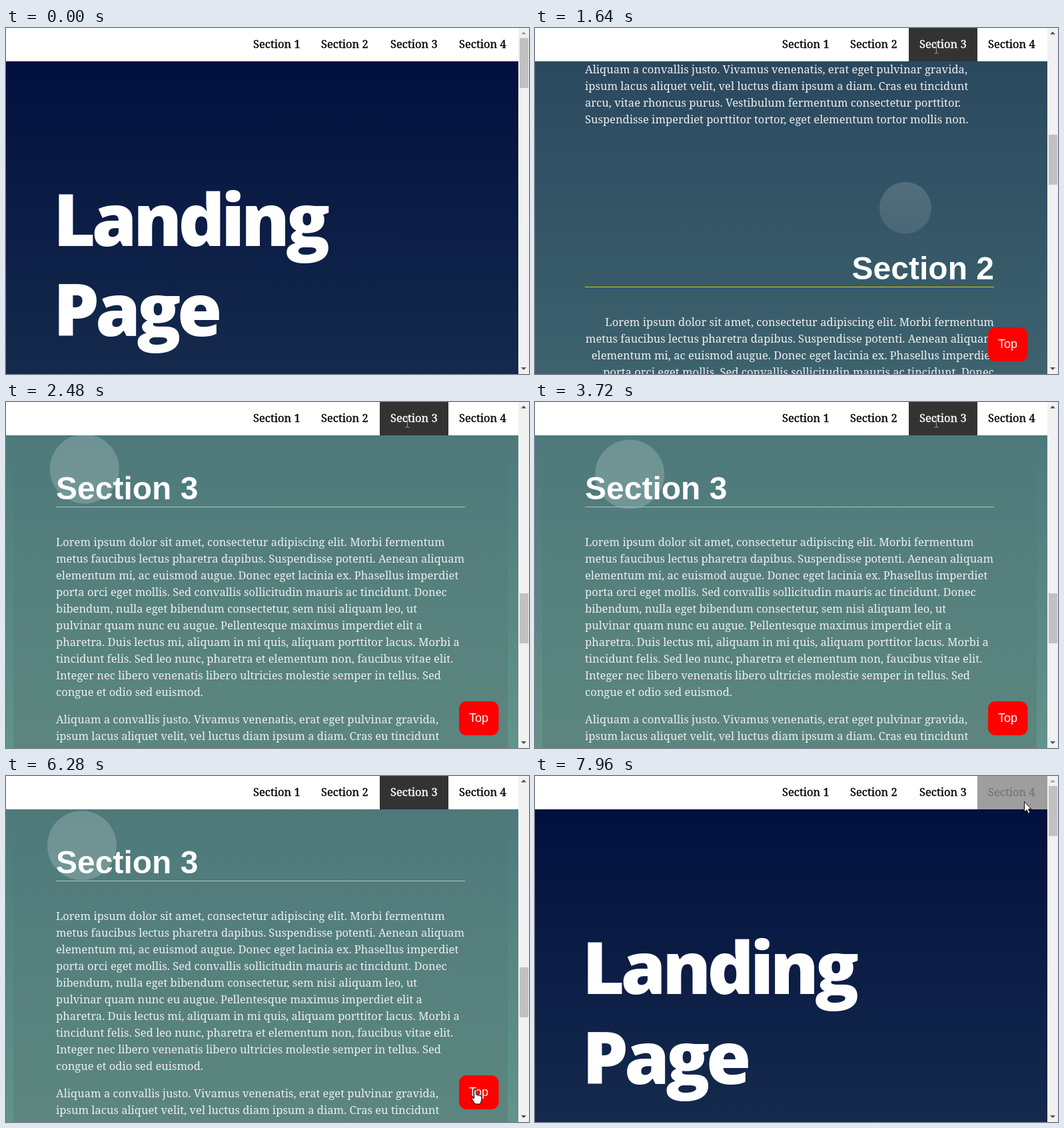
These frames come from a looping animation (785 px wide and 519 px high, 8000 ms). An HTML page:

```html
<!DOCTYPE html>
<html lang="en">
<head>
<meta charset="utf-8">
<title>Landing page</title>
<style>
  html, body { margin: 0; width: 100%; height: 100%; overflow: hidden; background: #fff; }
  svg { display: block; width: 100%; height: 100%; }
  text { white-space: pre; }
  .title { font: 800 109px "Open Sans", sans-serif; letter-spacing: -5.6px; fill: #fff; }
  .head { font: 700 48px "Liberation Sans", Arial, sans-serif; fill: #fff; }
  .copy { font: 16.55px "Noto Serif", serif; fill: #eee; }
  .nav { font: 16.55px "Noto Serif", serif; stroke-width: .35px; }
  .top { font: 18px "Liberation Sans", Arial, sans-serif; fill: #fff; }
</style>
</head>
<body>
<svg id="stage" viewBox="0 0 785 519" xmlns="http://www.w3.org/2000/svg">
  <defs>
    <linearGradient id="sky" x1="0" y1="0" x2="0" y2="1">
      <stop offset="0" stop-color="#000d3c"/>
      <stop offset="1" stop-color="#88cbab"/>
    </linearGradient>
    <linearGradient id="shade" x1="0" y1="0" x2="0" y2="1">
      <stop offset="0" stop-color="#464646" stop-opacity="0"/>
      <stop offset="1" stop-color="#464646" stop-opacity=".22"/>
    </linearGradient>
    <linearGradient id="glow" x1="0" y1="0" x2="0" y2="1">
      <stop offset="0" stop-color="#fff" stop-opacity=".16"/>
      <stop offset="1" stop-color="#fff" stop-opacity=".1"/>
    </linearGradient>
  </defs>
  <g id="page">
    <rect width="769" height="3384" fill="url(#sky)"/>
    <text class="title" x="71" y="327">Landing</text>
    <text class="title" x="71" y="462">Page</text>
    <rect id="panel" x="11" y="1900" width="742" height="600" fill="url(#shade)"/>
    <circle cx="556" cy="1276" r="39" fill="url(#glow)"/>
    <circle id="orb" r="52" fill="#fff"/>
  </g>
  <g id="button">
    <rect x="680" y="449" width="59.5" height="51" rx="11" fill="#f00"/>
    <text class="top" x="709.5" y="480" text-anchor="middle">Top</text>
  </g>
  <rect width="769" height="50" fill="#fff"/>
  <g id="menu"></g>
  <rect x="769" width="16" height="519" fill="#f1f1f1"/>
  <path id="up" d="M773 9.5L777 5.5L781 9.5Z"/>
  <path d="M773 509L777 513L781 509Z" fill="#505050"/>
  <rect id="thumb" x="771" width="13" height="75" fill="#c1c1c1"/>
  <g id="cursor">
    <path d="M-.5 .5V16L3 12.7L5.6 18.4L8 17.3L5.5 11.7H10Z" fill="#fff" stroke="#000"/>
    <path d="M-3 -7H-1L0 -6L1 -7H3M0 -6V6M-3 7H-1L0 6L1 7H3" fill="none" stroke="#b4b4b4" stroke-opacity=".85"/>
    <path d="M-1.5 12V1.5Q0 -.5 1.5 1.5V8L9 10Q10.5 11 10 15L8 22H0L-5 14Q-5 11 -1.5 14Z" fill="#fff" stroke="#000"/>
  </g>
</svg>
<script>
const LOOP = 8000, STEP = 70, TARGET = 1882, PITCH = 645;
const $ = id => document.getElementById(id);
const page = $("page"), menu = $("menu"), orb = $("orb"), cursor = $("cursor");

const paragraphs = [`Lorem ipsum dolor sit amet, consectetur adipiscing elit. Morbi fermentum
metus faucibus lectus pharetra dapibus. Suspendisse potenti. Aenean aliquam
elementum mi, ac euismod augue. Donec eget lacinia ex. Phasellus imperdiet
porta orci eget mollis. Sed convallis sollicitudin mauris ac tincidunt. Donec
bibendum, nulla eget bibendum consectetur, sem nisi aliquam leo, ut
pulvinar quam nunc eu augue. Pellentesque maximus imperdiet elit a
pharetra. Duis lectus mi, aliquam in mi quis, aliquam porttitor lacus. Morbi a
tincidunt felis. Sed leo nunc, pharetra et elementum non, faucibus vitae elit.
Integer nec libero venenatis libero ultricies molestie semper in tellus. Sed
congue et odio sed euismod.`,
`Aliquam a convallis justo. Vivamus venenatis, erat eget pulvinar gravida,
ipsum lacus aliquet velit, vel luctus diam ipsum a diam. Cras eu tincidunt
arcu, vitae rhoncus purus. Vestibulum fermentum consectetur porttitor.
Suspendisse imperdiet porttitor tortor, eget elementum tortor mollis non.`];

function add(parent, tag, attrs, text) {
  const el = document.createElementNS("http://www.w3.org/2000/svg", tag);
  set(el, attrs);
  if (text) el.textContent = text;
  return parent.appendChild(el);
}
function set(el, attrs) {
  for (const k in attrs) el.setAttribute(k, attrs[k]);
}

// Sections: heading, rule, two paragraphs; even ones are right aligned.
const rules = [1, 2, 3].map(n => {
  const y = 749 + (n - 1) * PITCH;
  const even = n % 2 === 0;
  const side = even ? { x: 689, "text-anchor": "end" } : { x: 75 };
  add(page, "text", { class: "head", y: y - 11, ...side }, "Section " + n);
  const rule = add(page, "rect", { x: 75, y, width: 614, height: 1, fill: "#cccc11" });
  let base = y + 59;
  for (const p of paragraphs) {
    for (const line of p.split("\n")) {
      add(page, "text", { class: "copy", y: base, ...side }, line);
      base += 25;
    }
    base += 16;
  }
  return rule;
});

const items = [[355, 102], [457, 104], [561, 103], [664, 105]].map(([x, width], i) => ({
  box: add(menu, "rect", { x, width, height: 50 }),
  label: add(menu, "text", { class: "nav", x: x + 16, y: 30 }, "Section " + (i + 1))
}));

const clamp = v => Math.max(0, Math.min(1, v));
const ramp = (t, start, length) => clamp((t - start) / length);
const smooth = v => v * v * (3 - 2 * v);
const lerp = (a, b, p) => a + (b - a) * p;
const mix = (a, b, p) => `rgb(${a.map((v, i) => Math.round(lerp(v, b[i], p)))})`;
const gray = v => [v, v, v];

// cubic-bezier(.42, 0, .58, 1)
function easeInOut(x) {
  let lo = 0, hi = 1;
  for (let i = 0; i < 24; i++) {
    const s = (lo + hi) / 2, r = 1 - s;
    if (1.26 * r * r * s + 1.74 * r * s * s + s * s * s < x) lo = s; else hi = s;
  }
  return smooth(lo);
}

// The screen refreshes every 70 ms while something moves.
const bursts = [0, 400, 1360, 6350, 6550, 7540];
function snap(t) {
  const start = bursts.filter(b => b <= t).pop();
  return start + Math.floor((t - start) / STEP) * STEP;
}

function scrollAt(t) {
  if (t < 1360 || t >= 6350) return 0;
  return TARGET * easeInOut(ramp(t, 1253, 744));
}

const path = [
  [400, 752, 460], [860, 602.5, 31], [4630, 602.5, 31], [5450, 681, 360],
  [6000, 704, 470], [7470, 704, 470], [7880, 735, 38], [LOOP, 735, 38]
];
function pointerAt(t) {
  let i = 1;
  while (i < path.length - 1 && path[i][0] < t) i++;
  const [t0, x0, y0] = path[i - 1], [t1, x1, y1] = path[i];
  const p = smooth(ramp(t, t0, t1 - t0));
  return [lerp(x0, x1, p), lerp(y0, y1, p)];
}

function drawMenu(t) {
  const third = smooth(ramp(t, 780, 250)) * (1 - smooth(ramp(t, 6300, 250)));
  const fourth = smooth(ramp(t, 7815, 300));
  [0, 0, third, fourth].forEach((p, i) => {
    const ink = mix(gray(0), gray(255), p);
    set(items[i].box, { fill: mix(gray(255), gray(51), p) });
    set(items[i].label, { fill: ink, stroke: ink });
  });
}

function drawCursor(t, scrolled) {
  const [x, y] = pointerAt(t);
  const onButton = scrolled && x > 680 && y > 449;
  const kind = onButton ? 2 : scrolled || y < 37 ? 1 : 0;
  [...cursor.children].forEach((el, i) => set(el, { display: i === kind ? "inline" : "none" }));
  set(cursor, {
    transform: `translate(${x.toFixed(1)} ${y.toFixed(1)})`,
    display: t < 400 ? "none" : "inline"
  });
}

function draw(time) {
  const t = snap(time), y = scrollAt(t), scrolled = y > 20;
  set(page, { transform: `translate(0 ${-Math.round(y)})` });
  set($("thumb"), { y: 15 + Math.round(y * 272 / TARGET) });
  set($("up"), { fill: y > 0 ? "#505050" : "#a3a3a3" });
  set($("button"), { display: scrolled ? "inline" : "none" });

  const active = t < 6350 ? 1 : 0;
  const angle = Math.PI + (t - 1870) / 4000 * 2 * Math.PI;
  set(orb, {
    cx: 127 + 16 * Math.cos(angle),
    cy: TARGET + 113.5 + 16 * Math.sin(angle),
    opacity: .187 * active * ramp(t, 1860, 230)
  });
  set($("panel"), { opacity: active * ramp(t, 1780, 140) });
  set(rules[2], { fill: mix([204, 204, 17], [169, 196, 189], active * ramp(t, 1920, 210)) });

  drawMenu(t);
  drawCursor(t, scrolled);
}

const began = performance.now();
function tick() {
  draw((performance.now() - began) % LOOP);
  requestAnimationFrame(tick);
}
tick();
</script>
</body>
</html>
```
